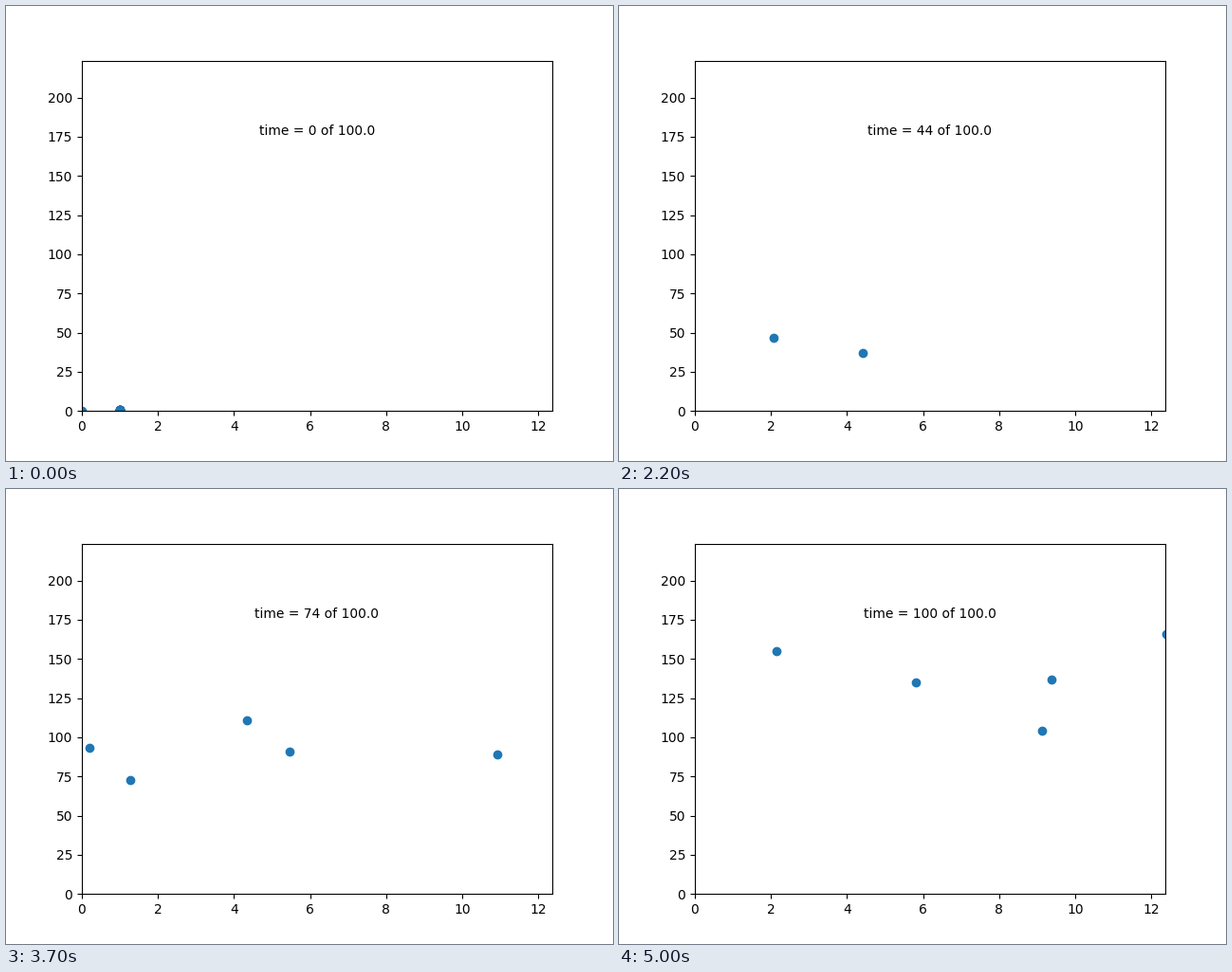
Animation of 640x480 px, one loop 5100 ms. Source, as a matplotlib script:

```python
import numpy as np
import matplotlib.pyplot as plt
from matplotlib.animation import FuncAnimation

FRAMES = 51
STEP = 2          # time units per frame
T_END = 100.0
X_MAX, Y_MAX = 12.367, 223.6
T_RISE = 22       # walkers rest at height 1 until then

# Sideways path: key points at shared times, all starting from x = 1.
KEY_TIMES = (0, 30, 44, 56, 74, 88, 100)
# (climb speed, change of speed, x at the key times after the start)
WALKERS = [
    (1.51, -0.0022, (1.46, -0.9, 1.23, 1.28, 3.9, 9.12)),
    (2.13, 0, (0.28, 2.08, 2, 4.35, 10.56, 12.38)),
    (1.645, 0.0014, (1.18, 4.42, 6.82, 10.93, 8.64, 9.37)),
    (2.22, -0.009, (0.73, -0.6, -1.5, 5.47, 3.18, -0.8)),
    (1.92, -0.0024, (-0.6, -0.7, 2.98, 0.2, 4.24, 5.81)),
    (1.985, 0, (-0.6, -0.6, -0.6, -0.6, 1.23, 2.15)),
]
# Some walkers only drift out through the left edge.
DRIFTS = np.random.default_rng(1).uniform(0.04, 0.07, 3)


def height(t, speed, bend=0):
    s = t - T_RISE
    return max(1, s * (speed + bend * s)) if s > 0 else 1


def positions(t):
    points = [(-0.02 * t, 0)]
    points += [(np.interp(t, KEY_TIMES, (1, *xs)), height(t, speed, bend))
               for speed, bend, xs in WALKERS]
    points += [(1 - drift * t, height(t, 1.8)) for drift in DRIFTS]
    return zip(*points)


fig, ax = plt.subplots(figsize=(6.4, 4.8), dpi=100)
ax.set_xlim(0, X_MAX)
ax.set_ylim(0, Y_MAX)
dots, = ax.plot([], [], "o", color="C0")
label = ax.text(0.5, 0.8, "", transform=ax.transAxes, ha="center", va="center")


def update(frame):
    t = frame * STEP
    dots.set_data(*positions(t))
    label.set_text(f"time = {t} of {T_END}")
    return dots, label


anim = FuncAnimation(fig, update, frames=FRAMES, interval=100,
                     repeat=True, repeat_delay=0)
plt.show()
```
